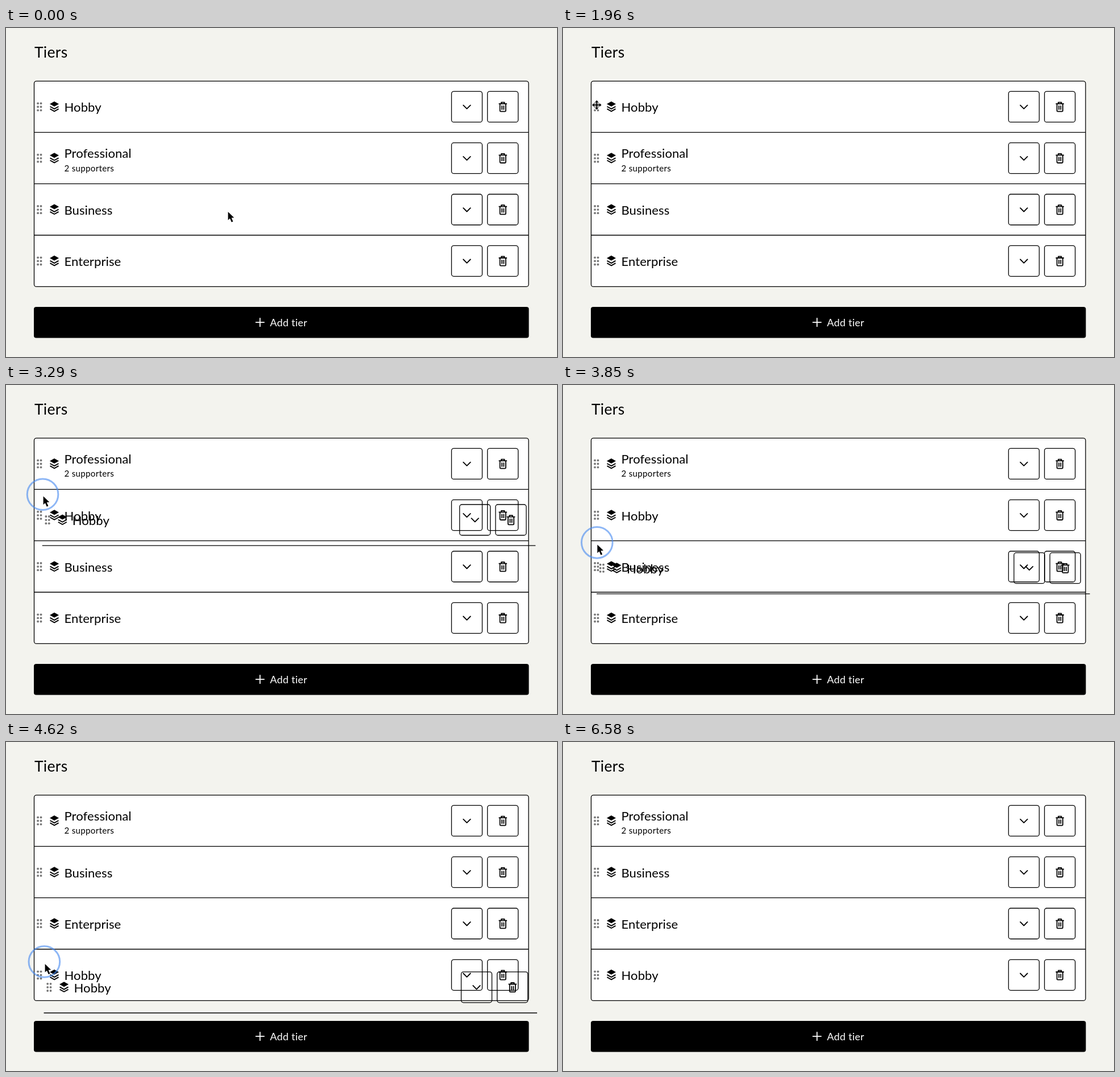
Animation, 969 px wide and 578 px high, one loop 7140 ms. Source, as an HTML page:

```html
<!DOCTYPE html>
<html lang="en">
<head>
<meta charset="utf-8">
<title>Reordering tiers</title>
<style>
  html, body { margin: 0; width: 100%; height: 100%; overflow: hidden; background: #f3f3ee; }
  svg { display: block; width: 969px; height: 578px; font-family: Lato, sans-serif; }
  .line { fill: none; stroke: #000; stroke-width: 1.3; }
  .icon { fill: none; stroke: #000; stroke-width: 1.8; stroke-linecap: round; stroke-linejoin: round; }
  .name { font-size: 22px; letter-spacing: .1px; }
  .note { font-size: 15px; letter-spacing: .35px; }
  .pointer { stroke: #fff; stroke-width: 1.4; paint-order: stroke; stroke-linejoin: round; }
</style>
</head>
<body>
<svg viewBox="0 0 969 578">
  <defs>
    <!-- Shared controls of a row, relative to the row's top left corner -->
    <g id="controls">
      <g id="dots" fill="#777"></g>
      <path d="M35.5 35.5l8 4.5-8 4.5-8-4.5z"/>
      <path d="M28 44.6l7.5 4.2 7.5-4.2M28 48.8l7.5 4.2 7.5-4.2" fill="none" stroke="#000" stroke-width="1.9"/>
      <rect class="line" x="734" y="18" width="54" height="54" rx="4"/>
      <rect class="line" x="797.2" y="18" width="54" height="54" rx="4"/>
      <path class="icon" d="M754.7 42.2l6.3 6.3 6.3-6.3"/>
      <path class="icon" d="M817.8 39.7h13M821.5 39.4v-2.2h5.6v2.2M819.2 39.9v12q0 1.4 1.4 1.4h7.4q1.4 0 1.4-1.4v-12M822.7 43.5v6M825.9 43.5v6"/>
    </g>
  </defs>
  <text x="50" y="51.8" font-size="26.5" letter-spacing=".3">Tiers</text>
  <rect class="line" x="49.5" y="93.4" width="869.5" height="361" rx="4" style="fill:#fff"/>
  <path class="line" d="M49.5 183.4h869.5M49.5 273.7h869.5M49.5 364h869.5"/>
  <g id="rows"></g>
  <rect x="49" y="490" width="870.5" height="54.5" rx="4"/>
  <path d="M438.8 517.2h15.8M446.7 509.3v15.8" stroke="#fff" stroke-width="1.8"/>
  <text x="464.3" y="523.8" font-size="18" letter-spacing=".25" fill="#fff">Add tier</text>
  <g id="ghost"></g>
  <circle id="ring" r="27.3" fill="none" stroke="#4a8cf0" stroke-opacity=".62" stroke-width="3"/>
  <path id="arrow" class="pointer" d="M0 0v14.6l3.3-3 2.8 6.5 2.7-1.1-2.8-6.4 4.6-.4z"/>
  <path id="move" class="pointer" d="M0-8.3l3.2 3.6H1v3.7h3.7v-2.2L8.3 0 4.7 3.2V1H1v3.7h2.2L0 8.3l-3.2-3.6H-1V1h-3.7v2.2L-8.3 0l3.6-3.2V-1H-1v-3.7h-2.2z"/>
</svg>
<script>
const LOOP = 7140, STEP = 70, LEFT = 49.5, TOP = 93.4, PITCH = 90.3;
const $ = id => document.getElementById(id);
const clamp = v => Math.max(0, Math.min(1, v));
const smooth = p => p * p * (3 - 2 * p);
const place = (el, x, y, s = 1) => el.setAttribute('transform', `translate(${x} ${y}) scale(${s})`);
const show = (el, on) => el.setAttribute('visibility', on ? 'visible' : 'hidden');

const tiers = [['Hobby'], ['Professional', '2 supporters'], ['Business'], ['Enterprise']];
const rowMarkup = ([name, note]) => `<use href="#controls"/>
  <text class="name" x="53" y="${note ? 44.2 : 54}">${name}</text>
  ${note ? `<text class="note" x="53" y="68">${note}</text>` : ''}`;

$('dots').innerHTML = [0, 1, 2, 3, 4, 5].map(i =>
  `<circle cx="${6.6 + i % 2 * 5.4}" cy="${39 + (i >> 1) * 6.1}" r="1.9"/>`).join('');
$('rows').innerHTML = tiers.map(t => `<g>${rowMarkup(t)}</g>`).join('');
$('ghost').innerHTML = rowMarkup(tiers[0]) + '<path class="line" d="M0 90.2h867.5"/>';
const rows = [...$('rows').children];

// Pointer path: time, x, y; a fourth value eases the move that ends there
const path = [
  [140, 390.5, 323], [280, 389.5, 324], [350, 389.5, 324],
  [1120, 80, 185, 1], [1470, 55, 138, 1], [1540, 55, 138], [1680, 56.5, 138],
  [1750, 56.5, 138], [1960, 59.3, 135.2], [2730, 59.3, 135.2],
  [2940, 61, 148], [3290, 65.6, 195.6], [3500, 65, 227.5], [3850, 60.4, 280.6],
  [4270, 60.5, 332], [4620, 68.6, 390], [6090, 68.6, 390],
  [6160, 82, 392.5], [6580, 400, 604]
];
const swaps = [3290, 3920, 4550];

function pointerAt(t) {
  const i = path.findIndex(k => k[0] > t);
  if (i < 0) return path[path.length - 1].slice(1, 3);
  if (i === 0) return path[0].slice(1, 3);
  const [t0, x0, y0] = path[i - 1], [t1, x1, y1, eased] = path[i];
  const p = (t - t0) / (t1 - t0), e = eased ? smooth(p) : p;
  return [x0 + (x1 - x0) * e, y0 + (y1 - y0) * e];
}

function draw(t) {
  const [x, y] = pointerAt(t);
  const [lagX, lagY] = pointerAt(t - 20);
  const ringX = lagX - .8, ringY = lagY - .7;

  const slot = swaps.filter(s => t >= s).length;
  rows.forEach((row, i) => {
    const index = i === 0 ? slot : i <= slot ? i - 1 : i;
    place(row, LEFT, TOP + index * PITCH);
  });

  const release = clamp((t - 5110) / 350);
  const press = smooth(clamp((t - 2030) / 420)) * (1 - smooth(release));
  place($('ring'), ringX, ringY, .5 + .5 * press);
  $('ring').setAttribute('opacity', press);

  place($('ghost'), ringX - .8, ringY - .2);
  $('ghost').setAttribute('opacity', 1 - release);
  show($('ghost'), t >= 2800 && release < 1);

  const moving = t >= 1330 && t < 2800;
  place($('arrow'), x, y);
  place($('move'), x, y);
  show($('arrow'), !moving && t < 6580);
  show($('move'), moving);
}

const start = performance.now();
function tick() {
  const t = (performance.now() - start) % LOOP;
  draw(Math.floor(t / STEP) * STEP);
  requestAnimationFrame(tick);
}
tick();
</script>
</body>
</html>
```
